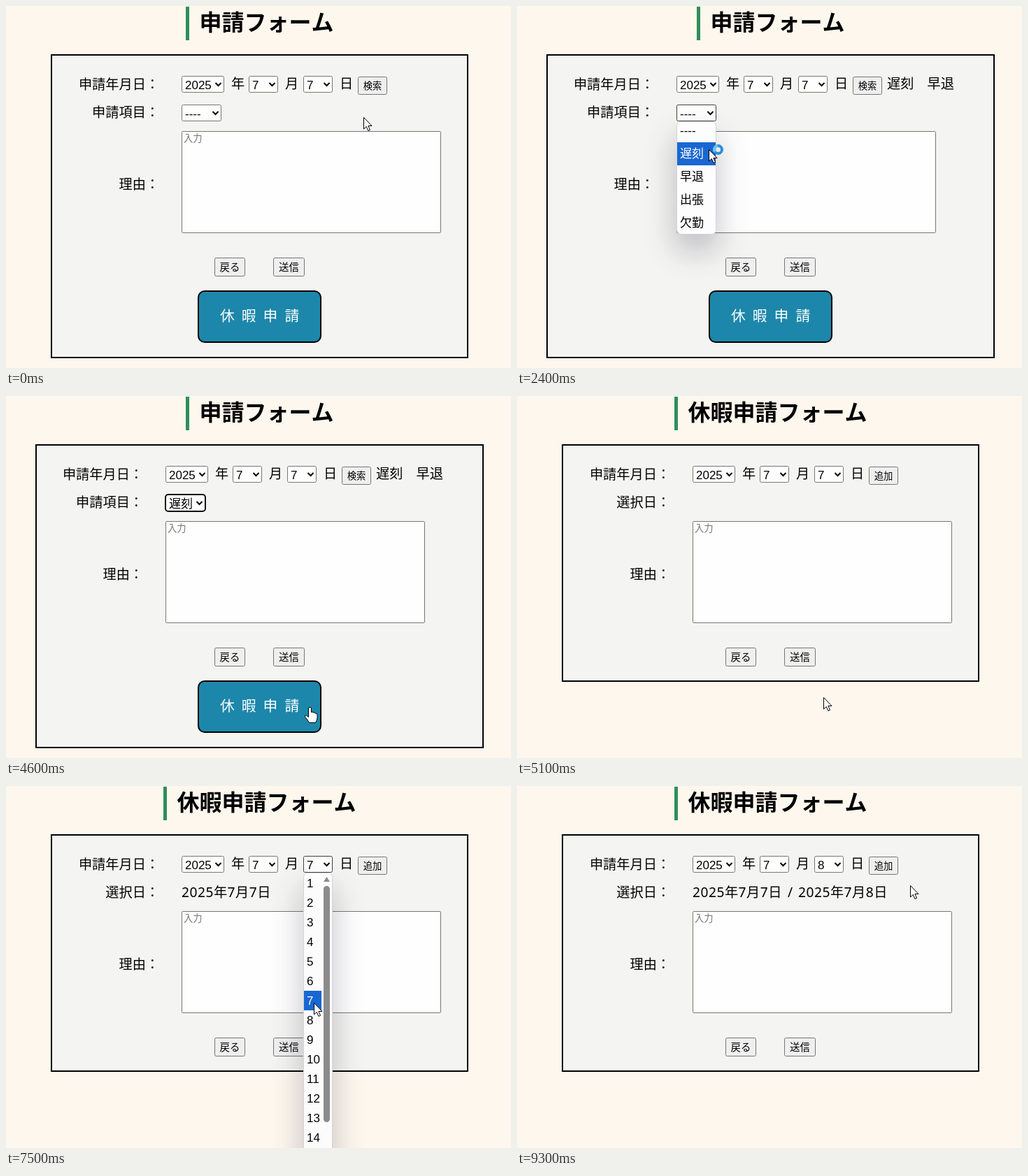
These frames come from a looping animation (722x518 px, 9.4 s). An HTML page with a canvas:

```html
<!DOCTYPE html>
<html lang="ja">
<head>
<meta charset="utf-8">
<title>申請フォーム</title>
<style>
html, body { margin: 0; width: 100%; height: 100%; overflow: hidden; background: #fdf7ee; }
canvas { display: block; }
</style>
</head>
<body>
<canvas id="stage" width="722" height="518" lang="ja"></canvas>
<script>
const ctx = document.getElementById('stage').getContext('2d');
const LOOP = 9400, STEP = 100;
const CJK = '"Noto Sans CJK JP", "Noto Sans CJK", sans-serif';
const ARIAL = '"Liberation Sans", ' + CJK;
const DATE = '"Noto Sans", ' + CJK;
const PAGE = '#fdf7ee', FORM = '#f4f4f2', PAPER = '#fefefe', LINE = '#767676';

// Moments when the page reacts to a click
const FOUND = 700, ITEM_OPEN = 1700, ITEM_PICK = 2800, LEAVE = 4900;
const FIRST_DATE = 6300, DAY_OPEN = 6900, DAY_PICK = 8000, SECOND_DATE = 8700;

// Pointer path: time, x, y of the hot spot
const path = [
  [0, 511, 159], [200, 511, 159], [500, 526, 115], [700, 526, 115],
  [1100, 447, 148], [1500, 274, 154], [1800, 274, 156], [2200, 274, 205],
  [2900, 274, 205], [4100, 430, 440], [4300, 434, 445],
  [5000, 434, 445], [5800, 537, 112], [6400, 537, 112], [6800, 455, 114],
  [7000, 455, 114], [7400, 440, 310], [7600, 440, 310], [7800, 440, 336],
  [8000, 440, 336], [8500, 532, 114], [8800, 532, 114], [9200, 562, 142], [LOOP, 562, 142]
];

function pointerAt(t) {
  const i = path.findIndex((p, n) => n > 0 && t < p[0]);
  const [a, b] = [path[i - 1], path[i]];
  const u = (t - a[0]) / (b[0] - a[0]), e = u * u * (3 - 2 * u);
  return { x: Math.round(a[1] + (b[1] - a[1]) * e), y: Math.round(a[2] + (b[2] - a[2]) * e) };
}

// cy is the optical middle of the line
function text(s, x, cy, size, { font = CJK, color = '#000', weight = 400, gap = 0, align = 'left' } = {}) {
  ctx.font = `${weight} ${size}px ${font}`;
  ctx.letterSpacing = gap + 'px';
  ctx.textAlign = align;
  ctx.fillStyle = color;
  ctx.fillText(s, x, cy + size * 0.37);
}

function box(x, y, w, h, r, fill, stroke, lw = 1) {
  ctx.beginPath();
  ctx.roundRect(x + lw / 2, y + lw / 2, w - lw, h - lw, r);
  ctx.fillStyle = fill;
  ctx.fill();
  ctx.lineWidth = lw;
  ctx.strokeStyle = stroke;
  ctx.stroke();
}

function select(value, x, y, w, { open = false, focus = false } = {}) {
  if (focus) box(x - 1, y - 1, w + 2, 26, 4, PAPER, '#101010', 2);
  else box(x, y, w, 24, 2, PAPER, open ? '#404040' : LINE);
  text(value, x + 5, y + 12.5, 17, { font: ARIAL });
  const cx = x + w - 8.5, cy = y + 12;
  ctx.beginPath();
  ctx.moveTo(cx - 4, cy - 2);
  ctx.lineTo(cx, cy + 2);
  ctx.lineTo(cx + 4, cy - 2);
  ctx.lineWidth = 2;
  ctx.strokeStyle = '#000';
  ctx.stroke();
}

function button(label, x, y, w, size, h, hover) {
  box(x, y, w, h, 2, hover ? '#e5e5e5' : '#efefef', hover ? '#4f4f4f' : LINE);
  text(label, x + w / 2, y + h / 2, size, { align: 'center' });
}

function popup(items, active, x, y, w, h, rowTop, rowH, rowW) {
  ctx.save();
  ctx.shadowColor = 'rgba(60,60,80,.3)';
  ctx.shadowBlur = 44;
  ctx.shadowOffsetY = 22;
  box(x, y, w, h, 6, PAPER, '#d4d4d4');
  ctx.restore();
  ctx.save();
  ctx.beginPath();
  ctx.roundRect(x + 1, y + 1, w - 2, h - 2, 5);
  ctx.clip();
  items.forEach((item, i) => {
    const top = rowTop + i * rowH;
    if (i === active) {
      ctx.fillStyle = '#1967d2';
      ctx.fillRect(x + 1, top, rowW, rowH);
    }
    text(item, x + 5, top + rowH / 2 - 0.5, 17, { font: ARIAL, color: i === active ? '#fff' : '#000' });
  });
  ctx.restore();
}

function itemPopup(p) {
  const active = Math.max(0, Math.floor((p.y - 161) / 33));
  popup(['----', '遅刻', '早退', '出張', '欠勤'], active, 228, 165, 57, 162, 162, 33, 55);
}

function dayPopup(p) {
  const days = Array.from({ length: 31 }, (_, i) => i + 1);
  const active = p.y < 125 ? 6 : Math.floor((p.y - 125) / 28);
  popup(days, active, 425, 124, 42, 420, 125, 28, 25);
  ctx.fillStyle = '#8b8b8b';
  ctx.beginPath();
  ctx.roundRect(454, 143, 9, 338, 4.5);
  ctx.moveTo(458.5, 130);
  ctx.lineTo(463, 137);
  ctx.lineTo(454, 137);
  ctx.fill();
}

const ARROW = new Path2D('M0 0V16.5L3.8 13L6.4 19L9 17.9L6.4 12H11.5Z');
const HAND = new Path2D('M-2 1.5Q-2 0 0 0Q2 0 2 1.5V7Q3.5 5.8 5 7.6Q6.5 6.6 8 8.6Q10.5 8 10.5 11V15Q10.5 18 8 22H-1Q-3 18 -7 13.5Q-7.6 11 -5 11.4L-2 14Z');

function pointer({ x, y }, hand, busy) {
  ctx.save();
  ctx.translate(x + 0.5, y + 0.5);
  ctx.fillStyle = '#fff';
  ctx.strokeStyle = '#000';
  ctx.lineWidth = 1;
  const shape = hand ? HAND : ARROW;
  ctx.fill(shape);
  ctx.stroke(shape);
  if (busy) {
    ctx.lineWidth = 4;
    ctx.strokeStyle = '#2b8fd8';
    ctx.beginPath();
    ctx.arc(13, 0, 5.5, 0, 7);
    ctx.stroke();
    ctx.strokeStyle = '#6cc4ee';
    ctx.beginPath();
    ctx.arc(13, 0, 5.5, 2.6, 4.6);
    ctx.stroke();
  }
  ctx.restore();
}

function draw(t) {
  const p = pointerAt(t);
  const leave = t >= LEAVE;
  const found = t >= FOUND && !leave;
  const picked = t >= ITEM_PICK;
  const dx = found ? -23 : 0;
  const itemOpen = t >= ITEM_OPEN && !picked;
  const dayOpen = t >= DAY_OPEN && t < DAY_PICK;
  const overAction = !dayOpen && p.x >= 503 + dx && p.x < 545 + dx && p.y >= 101 && p.y < 127;
  const overLink = !leave && p.x > 275 && p.x < 450 && p.y > 408 && p.y < 481;

  ctx.fillStyle = PAGE;
  ctx.fillRect(0, 0, 722, 518);

  const titleX = leave ? 225 : 257;
  ctx.fillStyle = '#2e8f59';
  ctx.fillRect(titleX, 1, 5, 48);
  text(leave ? '休暇申請フォーム' : '申請フォーム', titleX + 19.5, 23, 32, { weight: 700 });

  box(found ? 42 : 64, 69, found ? 641 : 597, leave ? 340 : 435, 0, FORM, '#000', 2);

  const label = (s, y) => text(s, 219 + dx, y, 19.2, { align: 'right' });
  label('申請年月日：', 112);
  label(leave ? '選択日：' : '申請項目：', 152);
  label('理由：', 255);

  select('2025', 251 + dx, 100, 61);
  text('年', 322 + dx, 111, 19.2);
  select('7', 347 + dx, 100, 42);
  text('月', 399 + dx, 111, 19.2);
  select(t >= DAY_PICK ? '8' : '7', 425 + dx, 100, 42, { open: dayOpen });
  text('日', 477 + dx, 111, 19.2);
  button(leave ? '追加' : '検索', 503 + dx, 101, 42, 13.33, 26, overAction);
  if (found) text('遅刻　早退', 529, 111, 19.2);

  if (leave) {
    const date = (s, x) => text(s, x, 152, 19.2, { font: DATE, gap: 0.5 });
    if (t >= FIRST_DATE) date('2025年7月7日', 251);
    if (t >= SECOND_DATE) {
      date('/', 387);
      date('2025年7月8日', 402);
    }
  } else {
    select(picked ? '遅刻' : '----', 251 + dx, 141, 57, { open: itemOpen, focus: picked });
  }

  box(251 + dx, 179, 371, 146, 1, PAPER, LINE);
  text('入力', 254 + dx, 189, 13.33, { color: '#757575' });
  button('戻る', 298, 360, 44, 14.4, 27);
  button('送信', 382, 360, 45, 14.4, 27);

  if (!leave) {
    box(274, 407, 177, 75, 9, '#1c87aa', '#000', 2);
    text('休暇申請', 306, 443, 20.8, { color: '#fff', gap: 10 });
  }

  if (itemOpen) itemPopup(p);
  if (dayOpen) dayPopup(p);
  pointer(p, overLink, t >= 2200 && t < 2700);
}

const start = performance.now();
function tick() {
  const t = (performance.now() - start) % LOOP;
  draw(Math.floor(t / STEP) * STEP);
  requestAnimationFrame(tick);
}
tick();
</script>
</body>
</html>
```
